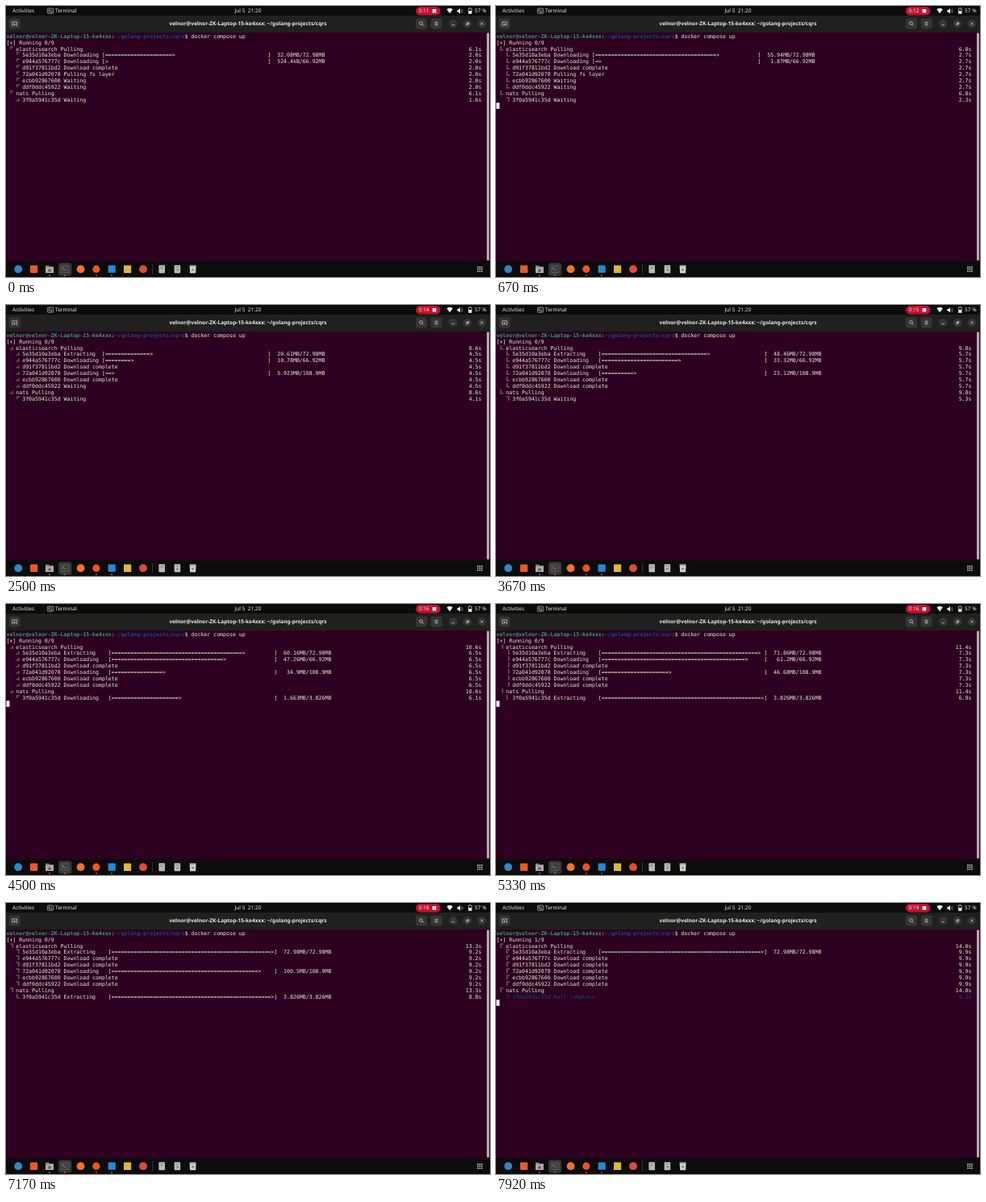
An HTML page that plays this animation: 600x337 px, repeating every 8000 ms.

```html
<!DOCTYPE html>
<html lang="en">
<head>
<meta charset="utf-8">
<title>Terminal</title>
<style>
  html, body { margin: 0; width: 100%; height: 100%; overflow: hidden; background: #0c0c0c; }
  svg { display: block; width: 100%; height: 100%; }
  text { white-space: pre; text-rendering: geometricPrecision; fill: #e8e8e8; }
  .ui { font: 6.5px "Noto Sans", "Open Sans", sans-serif; }
  .ui .title { font-weight: 700; font-size: 6.55px; }
  .mono text { font: 14.95px "DejaVu Sans Mono", "DejaVu Sans", monospace; }
  .mono .spinner { font: 16px "DejaVu Sans", sans-serif; }
  .mono .prompt tspan { font-weight: 700; }
  .line { fill: none; stroke: #ddd; stroke-width: .7; }
</style>
</head>
<body>
<svg viewBox="0 0 600 337" preserveAspectRatio="none">
  <rect width="600" height="337" fill="#0c0c0c"/>
  <rect y="11.9" width="600" height="21.2" fill="#20201f"/>
  <rect y="33" width="600" height="284.6" fill="#2c001e"/>
  <rect x="596" y="33.4" width="3" height="283.2" rx="1" fill="#b9a9b4"/>

  <g class="ui">
    <text x="8" y="8.4">Activities</text>
    <rect x="51.4" y="2.9" width="7.4" height="6.4" rx="1" fill="#333" stroke="#bbb" stroke-width=".6"/>
    <path class="line" d="M53 4.6l1.2 1.1-1.2 1.1M55 7.4h2"/>
    <text x="61" y="8.4">Terminal</text>
    <text x="300" y="8.4" text-anchor="middle">Jul 5  21:20</text>
    <rect x="508" y="1" width="30.5" height="10.4" rx="5.2" fill="#c5112f"/>
    <text id="clock" x="511.6" y="8.4"></text>
    <rect x="528.7" y="4" width="4.6" height="4.4" fill="#fff"/>
    <path d="M546.4 4.2Q550 1.4 553.8 4.2L550.1 9.2z" fill="#f2f2f2"/>
    <path d="M559.4 5h1.4l2.2-2v6.4l-2.2-2h-1.4z" fill="#f2f2f2"/>
    <path class="line" d="M564 4.6q1 1.6 0 3.2M565.2 3.4q2 2.8 0 5.6" opacity=".6"/>
    <path class="line" d="M573.4 3.3h1.2v-.9h1.4v.9h1.2v6.2h-3.8z"/>
    <rect x="573.6" y="6" width="3.4" height="3.4" fill="#f2f2f2"/>
    <text x="581" y="8.4">57 %</text>

    <text class="title" x="300" y="24.3" text-anchor="middle">velnor@velnor-ZK-Laptop-15-ke4xxx: ~/golang-projects/cqrs</text>
    <g fill="#353534">
      <rect x="3.6" y="15.4" width="14" height="13" rx="2.4"/>
      <rect x="508" y="15.4" width="14" height="13" rx="2.4"/>
      <rect x="526.6" y="15.4" width="14" height="13" rx="2.4"/>
      <circle cx="554.3" cy="22" r="5.2"/>
      <circle cx="572" cy="22" r="5.2"/>
      <circle cx="589.8" cy="22" r="5.2"/>
    </g>
    <g class="line">
      <path d="M9.2 24.4h-1.4v-4.6h5.8v4.6h-1.4M10.7 21.4v3M9.2 22.9h3"/>
      <circle cx="514.5" cy="21.4" r="1.9"/><path d="M515.9 22.8l1.8 1.8"/>
      <path d="M531.5 20.2h4M531.5 22h4M531.5 23.8h4"/>
      <path d="M552.8 23.4h3M570.8 21.6h2v2h-2zM571.6 20.6h2.2v2.2M588.3 20.5l3 3m0-3l-3 3"/>
    </g>
  </g>

  <g id="terminal" class="mono" transform="scale(.43924)">
    <text class="prompt" x="1" y="90.5"><tspan fill="#26a269">velnor@velnor-ZK-Laptop-15-ke4xxx</tspan>:<tspan fill="#12488b">~/golang-projects/cqrs</tspan>$ docker compose up</text>
    <rect id="cursor" x="1" y="274" width="9" height="17" fill="#fff"/>
  </g>

  <g id="dock">
    <rect x="65" y="319.4" width="16.4" height="16" rx="3" fill="#363636"/>
    <circle cx="15.2" cy="327.2" r="4.9" fill="#3584c6"/>
    <rect x="29.9" y="322.4" width="9.4" height="9.6" rx="1.4" fill="#e8592b"/>
    <path d="M49 322.8h4l1 1.2h5v8h-10z" fill="#8d8585"/>
    <rect x="49" y="325" width="10" height="7" rx=".8" fill="#b3a8a8"/>
    <path d="M52 328.4l2-1.8 2 1.8v2h-4z" fill="#6d6262"/>
    <rect x="68.4" y="322.8" width="9.6" height="8.8" rx="1" fill="#3f3f3f" stroke="#666" stroke-width=".7"/>
    <path class="line" d="M70.2 325l1.4 1.2-1.4 1.2M72.4 328h2" opacity=".7"/>
    <circle cx="92.6" cy="327.2" r="4.9" fill="#f4712c"/>
    <circle cx="111.9" cy="327.2" r="4.6" fill="#f2512c"/>
    <rect x="126.6" y="322.6" width="9.2" height="9.2" rx="1" fill="#2489d0"/>
    <rect x="146" y="322.4" width="9.2" height="9.6" rx=".6" fill="#dfb63c"/>
    <circle cx="170" cy="327.2" r="4.9" fill="#dd4b3a"/>
    <path d="M181.6 321v12.4" stroke="#4a4a4a" stroke-width=".7"/>
    <g fill="#b9b9b7">
      <rect x="189.4" y="322.2" width="7.6" height="10" rx="1"/>
      <rect x="208.6" y="322.2" width="7.6" height="10" rx="1"/>
      <path d="M227.6 322.4h8l-.5 9.8h-7z" fill="#d2d2cc"/>
    </g>
    <g fill="#888">
      <rect x="191" y="324" width="4.4" height=".8"/><rect x="191" y="326" width="4.4" height=".8"/>
      <rect x="210.2" y="324" width="4.4" height=".8"/><rect x="211.4" y="327" width="2.4" height="2.4"/>
      <rect x="227.8" y="323.4" width="7.6" height=".8"/><circle cx="231.6" cy="328" r="1.6"/>
    </g>
  </g>
</svg>
<script>
const LOOP = 8000, FPS = 12, LINE = 18, CELL = 9;
const SPINNER = '⠋⠙⠹⠸⠼⠴⠦⠧⠇⠏';
const $ = id => document.getElementById(id);

function add(parent, tag, attrs) {
  const el = document.createElementNS('http://www.w3.org/2000/svg', tag);
  for (const key in attrs) el.setAttribute(key, attrs[key]);
  return parent.appendChild(el);
}

for (const x of [54, 73, 112, 131]) add($('dock'), 'circle', { cx: x, cy: 335, r: .9, fill: '#e95420' });
for (let i = 0; i < 9; i++) {
  add($('dock'), 'rect', { x: 584.2 + i % 3 * 2.5, y: 324 + Math.floor(i / 3) * 2.5, width: 1.5, height: 1.5, fill: '#ddd' });
}

// Phases: [first tick, status, total MB, [[tick, MB], ...]]
const DONE = 'Download complete';
const layer = (id, phases, offset = 4.1, spin = 0) => ({ id, phases, offset, spin, indent: 3 });
const service = id => ({ id, phases: [[0, 'Pulling']], offset: 0, spin: 0, indent: 1 });
const events = [
  service('elasticsearch'),
  layer('5e35d10a3eba', [
    [0, 'Downloading', 72.98, [[0, 32.08], [12, 72.98]]],
    [12, DONE],
    [17, 'Extracting', 72.98, [[16, .6], [25, 20.61], [37, 48.46], [53, 71.86], [58, 72.98]]]]),
  layer('e944a576777c', [
    [0, 'Downloading', 66.92, [[0, .5244], [14, 3.215], [25, 10.78], [37, 33.32], [53, 61.2], [57, 66.92]]],
    [57, DONE]]),
  layer('d91f37811bd2', [[0, DONE]]),
  layer('72a041d92078', [
    [0, 'Pulling fs layer'],
    [9, 'Downloading', 108.9, [[9, .53], [14, 1.598], [25, 5.923], [37, 23.12], [53, 46.68], [64, 78.2], [75, 108.9]]],
    [75, DONE]]),
  layer('ecbb92867600', [[0, 'Waiting'], [19, DONE]]),
  layer('ddf0ddc45922', [[0, 'Waiting'], [30, DONE]]),
  service('nats'),
  layer('3f0a5941c35d', [
    [0, 'Waiting'],
    [42, 'Downloading', 3.826, [[42, .04], [49, 3.826]]],
    [49, DONE],
    [51, 'Extracting', 3.826, [[51, 3.826]]],
    [77, 'Pull complete']], 4.5, 5)
];

const cellText = (col, row) => add($('terminal'), 'text', { x: 1 + col * CELL, y: 90.5 + row * LINE });
const summary = cellText(0, 1);
events.forEach((ev, i) => {
  ev.spinner = cellText(ev.indent, i + 2);
  ev.spinner.setAttribute('class', 'spinner');
  ev.body = cellText(ev.indent + 2, i + 2);
  ev.time = cellText(149, i + 2);
  ev.time.setAttribute('text-anchor', 'end');
});

function interpolate(points, tick) {
  const next = points.findIndex(p => p[0] > tick);
  if (next < 0) return points[points.length - 1][1];
  if (next === 0) return points[0][1];
  const [t0, a] = points[next - 1], [t1, b] = points[next];
  return a + (b - a) * (tick - t0) / (t1 - t0);
}

const size = mb => mb < 1 ? +(mb * 1000).toPrecision(4) + 'kB' : +mb.toPrecision(4) + 'MB';

function progressBar(done, total) {
  const filled = Math.floor(Math.floor(done / total * 100) / 2);
  return `[${('='.repeat(filled) + '>').padEnd(51)}] ${size(done).padStart(8)}/${size(total)}`;
}

function draw(ms) {
  const frame = Math.min(LOOP * FPS / 1000 - 1, Math.floor((ms + 4) * FPS / 1000));
  const t = frame * 1000 / FPS;
  const tick = Math.floor((t * 1.002 + 32.5) / 100);

  $('clock').textContent = '0:' + (11 + Math.floor(t / 1000 + .6));
  $('cursor').style.display = Math.floor((t - 455) / 609) % 2 === 0 ? '' : 'none';

  let pad = 0, finished = 0;
  for (const ev of events) {
    ev.phase = ev.phases.filter(p => p[0] <= tick).pop();
    ev.label = `${ev.id} ${ev.phase[1]}`;
    // Each nested entry narrows the status column by its indent.
    pad = Math.max(pad, ev.label.length) - (ev.indent > 1 ? 2 : 0);
  }
  for (const ev of events) {
    const [since, status, total, points] = ev.phase;
    const complete = status === 'Pull complete';
    if (complete) finished++;
    ev.spinner.textContent = complete ? '⠿' : SPINNER[(tick + ev.spin) % 10];
    ev.body.textContent = total
      ? `${ev.label.padEnd(pad)} ${progressBar(interpolate(points, tick), total)}`
      : ev.label;
    ev.time.textContent = (6.1 + (complete ? since : tick) / 10 - ev.offset).toFixed(1) + 's';
    for (const el of [ev.spinner, ev.body, ev.time]) el.style.fill = complete ? '#12488b' : '';
  }
  summary.textContent = `[+] Running ${finished}/9`;
}

const start = performance.now();
function loop() {
  draw((performance.now() - start) % LOOP);
  requestAnimationFrame(loop);
}
loop();
</script>
</body>
</html>
```
